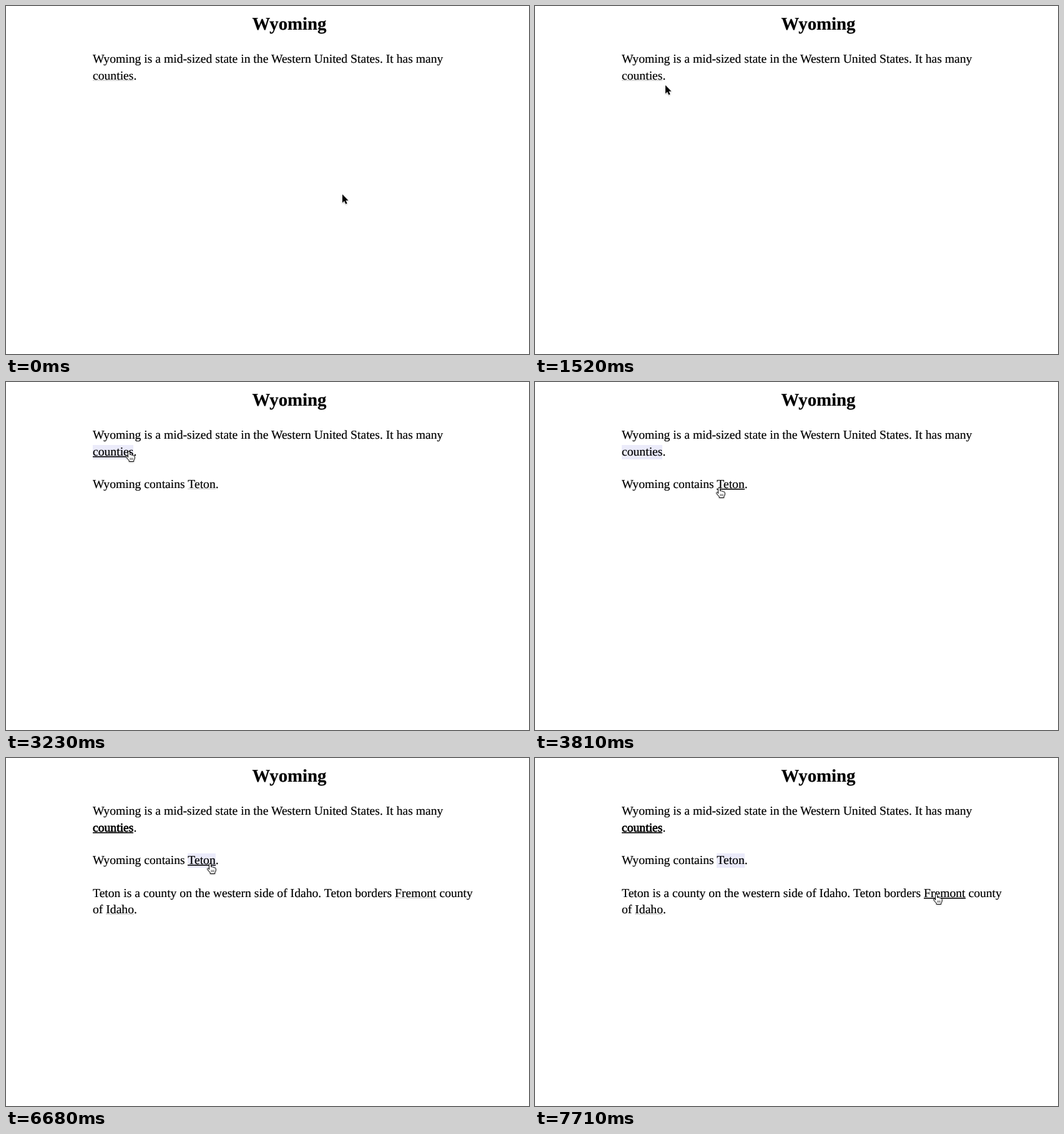
Animation, 838 px wide and 558 px high, one loop 8 s. Source, as an HTML page:

```html
<!DOCTYPE html>
<html lang="en">
<head>
<meta charset="utf-8">
<title>Wyoming</title>
<style>
  html, body { margin: 0; width: 100%; height: 100%; overflow: hidden; background: #fff; }
  body {
    position: relative; color: #000; font: 19.65px/26.25px "Liberation Serif", Times, serif;
    text-rendering: geometricPrecision; -webkit-text-stroke: .2px #000;
  }
  h1, main { position: absolute; left: 139px; width: 630px; margin: 0; white-space: nowrap; }
  h1 { top: 13px; font-size: 28.8px; line-height: 32px; text-align: center; }
  main { top: 72.3px; }
  p { margin: 0 0 26.25px; }
  a { padding-bottom: 1px; background: linear-gradient(#c4c4c4, #c4c4c4) 0 18.4px / 100% 1px no-repeat; }
  a.open { background-color: #ebebfa; background-image: none; }
  a.done { -webkit-text-stroke-width: .75px; }
  a.done, a.hover { background-image: linear-gradient(#000, #000); background-size: 100% 1.6px; }
  svg { position: absolute; left: 0; top: 0; overflow: visible; filter: drop-shadow(0 1px 1px #0004); }
</style>
</head>
<body>
<h1>Wyoming</h1>
<main>
  <p>Wyoming is a mid-sized state in the Western United States. It has many<br><a id="counties">counties</a>.</p>
  <p id="second">Wyoming contains <a id="teton">Teton</a>.</p>
  <p id="third">Teton is a county on the western side of Idaho. Teton borders <a>Fremont</a> county<br>of <a>Idaho</a>.</p>
</main>
<svg id="cursor" width="1" height="1">
  <path id="arrow" d="M0 0V13.4L3 10.6L5.3 15.6L7.6 14.6L5.4 9.7H9.5Z" stroke="#fff" paint-order="stroke"/>
  <g id="hand" transform="translate(-1 -1.5)" fill="#fff" stroke="#000" stroke-linejoin="round" stroke-linecap="round">
    <path d="M-1.5 9V1.2Q-1.3 -.5 0 -.5T1.5 1.2V5Q3.6 4.2 4.3 5.7Q6.3 5 6.9 6.6Q9 6 9.2 8V10.5Q9 12.5 7.7 14V16H.2V14.3L-4.2 9.2Q-5 7.6 -3.4 7.2Q-2.4 7.3 -1.5 9Z"/>
    <path d="M2 10.5V13M4 10.5V13M6 10.5V13" stroke-width=".7"/>
  </g>
</svg>
<script>
const LOOP = 8000, SHOW_COUNTY = 2390, SHOW_BORDERS = 4530;
// Each sweep slows towards its end and sags below the straight line
const moves = [
  { start: 480, end: 1710, from: [539, 302], to: [195, 111], ease: .63, sag: 52 },
  { start: 3210, end: 4120, from: [195, 111], to: [317, 167], ease: .6, sag: 21 },
  { start: 6660, end: 7710, from: [317, 167], to: [644, 220], ease: .5, sag: 56 }
];
const $ = id => document.getElementById(id);
const links = [...document.querySelectorAll("a")];
const mix = (a, b, p) => a + (b - a) * p;

function cursorAt(t) {
  const { start, end, from, to, ease, sag } = moves.findLast(m => t >= m.start) || moves[0];
  const u = Math.min(1, Math.max(0, (t - start) / (end - start)));
  const p = (u * u * (3 - 2 * u)) ** ease;
  return [mix(from[0], to[0], p), mix(from[1], to[1], p) + sag * Math.sin(Math.PI * p ** 1.3)];
}

function linkAt(x, y) {
  return links.find(link => {
    const r = link.getBoundingClientRect();
    return x >= r.left && x <= r.right && y >= r.top && y < r.bottom;
  });
}

function draw(t) {
  const first = t >= SHOW_COUNTY, second = t >= SHOW_BORDERS;
  $("second").hidden = !first;
  $("third").hidden = !second;
  $("counties").className = second ? "done" : first ? "open" : "";
  $("teton").className = second ? "open" : "";

  const [x, y] = cursorAt(t), target = linkAt(x, y);
  links.forEach(link => link.classList.toggle("hover", link === target));
  $("arrow").style.display = target ? "none" : "";
  $("hand").style.display = target ? "" : "none";
  $("cursor").style.transform = `translate(${Math.round(x)}px, ${Math.round(y)}px)`;
}

function tick() {
  draw(performance.now() % LOOP);
  requestAnimationFrame(tick);
}
tick();
</script>
</body>
</html>
```
